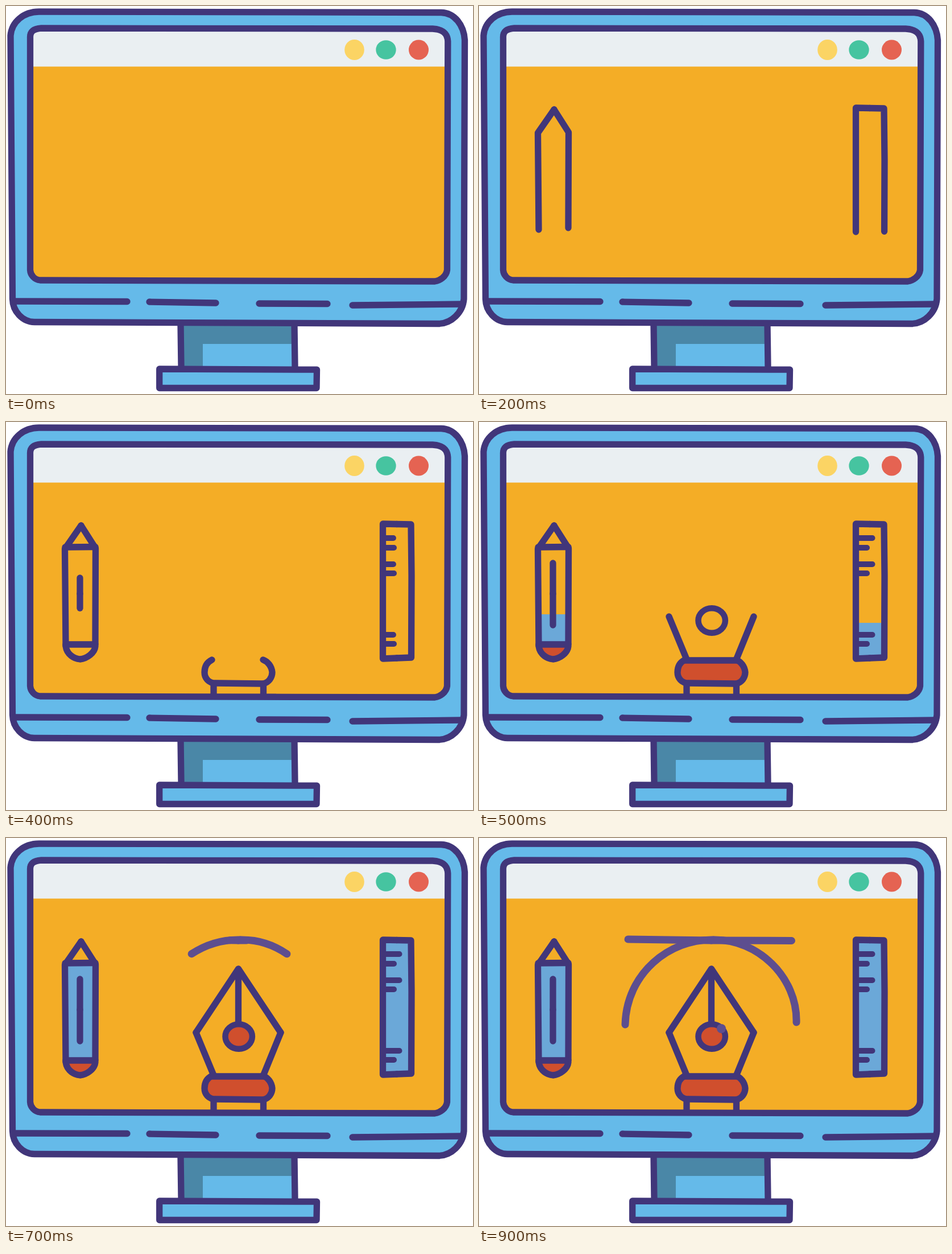
An HTML page that plays this animation: 821x682 px, repeating every 1 s.

```html
<!DOCTYPE html>
<html lang="en">
<head>
<meta charset="utf-8">
<title>Design tools on a monitor</title>
<style>
  html, body { margin: 0; height: 100%; overflow: hidden; background: #fff; }
  svg { display: block; width: 100vw; height: 100vh; }
  .ink { stroke: #41367a; stroke-width: 11.3; stroke-linecap: round; stroke-linejoin: round; fill: none; }
</style>
</head>
<body>
<svg viewBox="0 0 821 682">
  <defs>
    <path id="glass" d="M42.500 56C42 45 48 40 62 39L750 40C768 41 776 48 776.800 62L775.500 464C774 476 762 483 754 484L60 482C50 481 43 473 42.500 464Z"/>
    <clipPath id="inside"><use href="#glass"/></clipPath>
  </defs>
  <!-- stand -->
  <path fill="#4a87a7" d="M308 558H507V636H308Z"/>
  <path fill="#65bae9" d="M346 594H507V636H346Z"/>
  <path class="ink" d="M307 560L308 634M507 560L508 634"/>
  <path class="ink" style="fill:#65bae9" d="M269.700 638L546.500 639.200L546 671.500L269.700 671.500Z"/>
  <!-- body -->
  <path class="ink" style="fill:#65bae9" d="M8 52C10 28 31 10 58 10L765 11.500C789 12 805 34 806.500 60L805 515C803 539 783 558 760 558.500L50 555.500C29 555 12 537 11.500 515Z"/>
  <path class="ink" d="M15 519L213 519.500M252 520L369 522M445 523L565 523.500M609 526L803 524"/>
  <!-- screen -->
  <use href="#glass" fill="#eaeff2"/>
  <path clip-path="url(#inside)" fill="#f4ad26" d="M40 106.500H780V490H40Z"/>
  <ellipse cx="612.500" cy="77" rx="17.300" ry="18" fill="#fbd464"/>
  <ellipse cx="668" cy="77" rx="17.700" ry="16.800" fill="#46c4a0"/>
  <circle cx="725.500" cy="77" r="17.500" fill="#e56352"/>
  <g id="fills"></g>
  <g id="lines" class="ink"></g>
  <use href="#glass" class="ink"/>
</svg>
<script>
const BLUE = '#6ba8d8', RED = '#d04f2d', VIOLET = '#5d4e8f';
const fills = document.getElementById('fills');
const lines = document.getElementById('lines');
const parts = [];

function add(group, d, attrs, start, update) {
  const el = document.createElementNS('http://www.w3.org/2000/svg', 'path');
  el.setAttribute('d', d);
  for (const key in attrs) el.setAttribute(key, attrs[key]);
  group.append(el);
  parts.push({ el, start, update });
}

// A stroke drawn up to the given share of its length, one share per step
function stroke(d, start, shares = [1], style = '') {
  add(lines, d, { pathLength: 1, style }, start, (el, n) => {
    const share = shares[Math.min(n, shares.length - 1)];
    el.setAttribute('stroke-dasharray', share < 1 ? share + ' 2' : 'none');
  });
}

function area(d, start, fill) {
  add(fills, d, { fill }, start);
}

// A column that fills upwards, with one top edge per step
function column(x1, x2, bottom, start, tops) {
  add(fills, '', { fill: BLUE }, start, (el, n) => {
    const top = tops[Math.min(n, tops.length - 1)];
    el.setAttribute('d', `M${x1} ${bottom}V${top}H${x2}V${bottom}Z`);
  });
}

// Pencil
const tip = 'M105 394C107 409 120 416 130 417C142 416 156 406 157 394';
column(105, 156, 390, 5, [338, 260, 220]);
area(tip + 'V390H105Z', 5, RED);
stroke('M132 182L103.500 223L105 393', 1, [.47, 1]);
stroke('M132 182L157.500 222L157 390', 1, [.47, 1]);
stroke('M104 220L157 219.500M105 391H157', 3);
stroke(tip, 3);
stroke('M130 302V248', 4, [.52, 1]);
stroke('M130 302V357', 4, [.46, 1]);

// Ruler
column(664, 711, 414, 5, [353, 255, 181]);
stroke('M687 179.500L662.500 179L662.500 416L687 415', 1, [.42, .848, 1]);
stroke('M687 179.500L712 180L713 270L712.500 414L687 415', 1, [.42, .848, 1]);
[[204, 1], [221, 0], [250, 1], [266, 0], [374, 1], [390, 0]].forEach(([y, long]) =>
  stroke(`M663 ${y}H${long ? 691.5 : 682}`, 4, [long ? .63 : 1, 1], 'stroke-width:10'));

// Pen nib
const collar = 'M362 418C354 422 349 429 349 440C349 450 356 459 368 459L452 460C462 458 468 449 468 440C467 429 460 421 452 418';
area(collar + 'Z', 5, RED);
area('M386 349a23.500 21.500 0 1 0 47 0a23.500 21.500 0 1 0 -47 0Z', 6, RED);
stroke('M365 480V460M452.500 480V460', 3);
stroke(collar, 4);
stroke('M362 419H454', 5);
stroke('M365 417L334 342M452.500 417L483 342', 5);
stroke('M385.500 349a23.700 21.700 0 1 0 47.400 0a23.700 21.700 0 1 0 -47.400 0Z', 5, [1], 'stroke-width:10.500');
stroke('M334 342L408.500 230L483 342M408.500 232V325', 6);

// Curve with its handles
const soft = `stroke:${VIOLET};stroke-width:13`;
stroke('M412 179C335 177 259 238 257 328', 7, [.38, .74, 1], soft);
stroke('M412 179C490 177 560 245 558 324', 7, [.38, .79, 1], soft);
stroke('M408 180L262 178', 7, [.1, .54, 1], soft);
stroke('M408 180L549.500 180.500', 7, [.1, .56, 1], soft);
stroke('M426 335h.01', 9, [1], `stroke:${VIOLET};stroke-width:16`);

let shown = -1;
function draw(now) {
  const step = Math.floor(now / 100) % 10;
  if (step !== shown) {
    shown = step;
    for (const { el, start, update } of parts) {
      el.style.display = step < start ? 'none' : '';
      if (update && step >= start) update(el, step - start);
    }
  }
  requestAnimationFrame(draw);
}
draw(performance.now());
</script>
</body>
</html>
```
